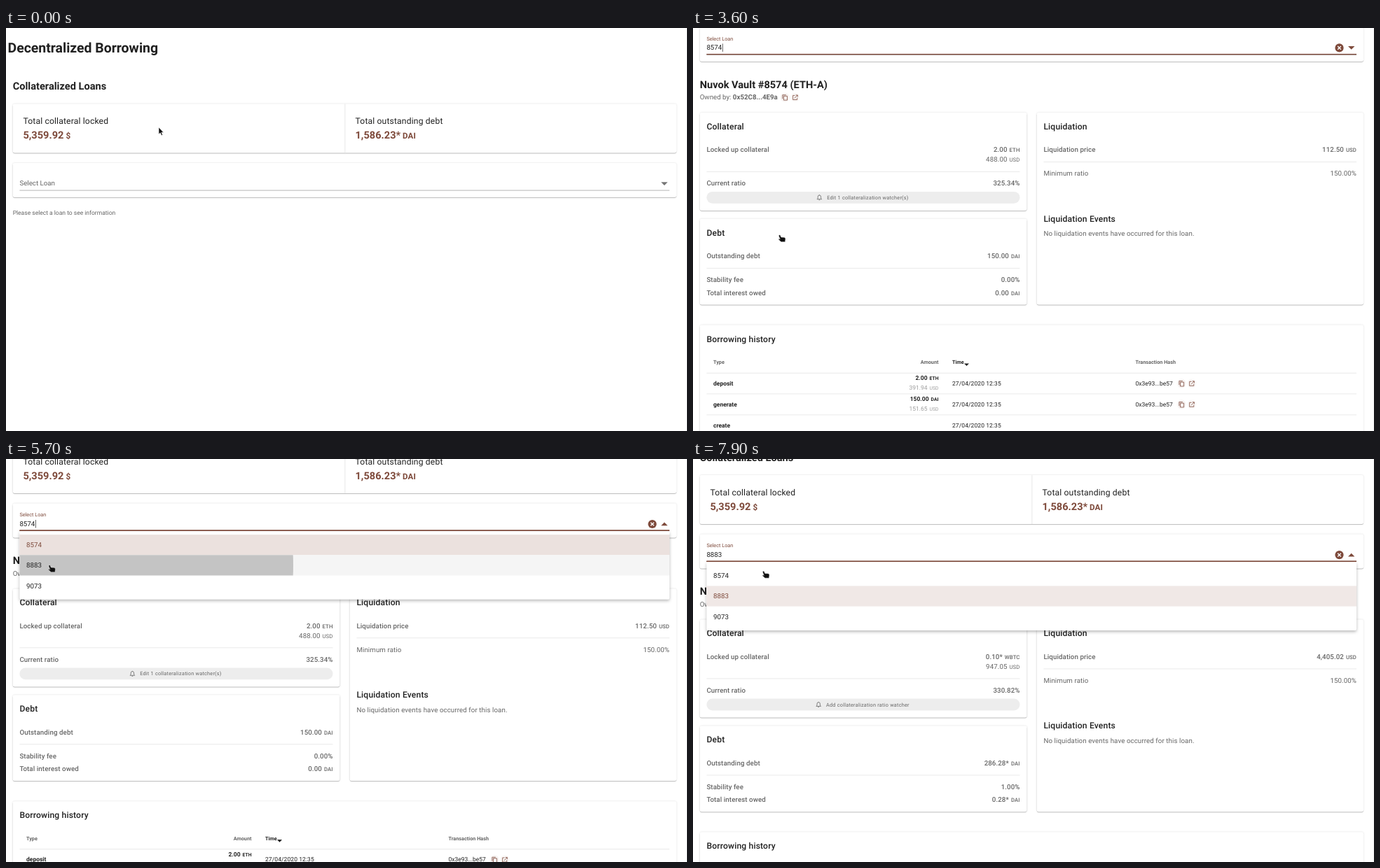
These frames come from a looping animation (972x576 px, 8 s). An HTML page:

```html
<!DOCTYPE html>
<html lang="en">
<head>
<meta charset="utf-8">
<title>Decentralized Borrowing</title>
<style>
html, body { margin: 0; width: 100%; height: 100%; overflow: hidden; background: #fff; }
svg { display: block; width: 972px; height: 576px; font-family: Roboto, sans-serif; }
text { fill: #212121; text-rendering: geometricPrecision; white-space: pre; }
.m { font-weight: 500; }
.b { font-weight: 700; }
.e { text-anchor: end; }
.g { fill: #666; }
.l { fill: #9e9e9e; }
.p { fill: #7e4a3b; }
.card { fill: #fff; filter: drop-shadow(0 1px .5px rgba(0,0,0,.2)) drop-shadow(0 .3px 1px rgba(0,0,0,.14)); }
.menu { fill: #fff; filter: drop-shadow(0 2px 2px rgba(0,0,0,.28)); }
.line { fill: #e0e0e0; }
.icon { fill: none; stroke: #7e4a3b; stroke-width: .8; }
</style>
</head>
<body>
<svg viewBox="0 0 972 576">
  <defs>
    <g id="copy">
      <circle r="6.5" fill="#7e4a3b" opacity=".06"/>
      <path class="icon" d="M-3.4 2V-3.5H1.6M-1.8 -1.9H3.3V3.9H-1.8Z"/>
    </g>
    <g id="open">
      <circle r="6.5" fill="#7e4a3b" opacity=".04"/>
      <path class="icon" d="M-.4 -2.8H-3.2V3.3H2.9V.6M.8 -3.3H3.5V-.6M3.4 -3.2L-1 1.2"/>
    </g>
    <path id="bell" d="M-3.3 2.4H3.3L2.2 1.1V-1A2.2 2.3 0 0 0 -2.2 -1V1.1ZM-.8 3.5H.8M0 -3.2V-4" fill="none" stroke="#666" stroke-width=".8"/>
    <clipPath id="rowClip"><rect id="clipRect" x="19.4" width="927.6" height="29.2"/></clipPath>
  </defs>
  <rect x="971" width="1" height="576" fill="#f0f0f0"/>
  <g id="page">
    <g id="top"></g>
    <g id="vaultA"></g>
    <g id="vaultB"></g>
    <g id="field"></g>
    <g id="menu"></g>
  </g>
  <path id="arrow" d="M0 0V9.8L2.2 7.8L3.9 11.5L5.5 10.8L3.9 7.2H6.8Z" fill="#111" stroke="#fff" stroke-width=".5"/>
  <path id="hand" d="M1.3 .4Q2.6 -.3 3.2 1L4.2 3.5L8.8 3.8Q10.5 4.1 10.5 5.8L10 10.2H4.3L.6 6.8Q.2 5.7 1.6 5.7L2.8 6.4L1 1.7Q.8 .8 1.3 .4Z" fill="#111" stroke="#fff" stroke-width=".4"/>
</svg>
<script>
const $ = id => document.getElementById(id);
const S = 0.6075;                       // page zoom
const px = n => +(n * S).toFixed(3);
const BODY = 0.009, TITLE = 0.0125;     // letter spacing in em

// y is the middle of the capitals; size is in unzoomed pixels
const text = (x, y, str, size, cls = '', track = 0) =>
  `<text x="${x}" y="${y + px(size) * 0.355}" font-size="${px(size)}" class="${cls}" letter-spacing="${px(size) * track}">${str}</text>`;
const unit = (num, name, size) => `${num}<tspan dx="3" font-size="${px(size) * 0.8}">${name}</tspan>`;
const rect = (x, y, w, h, cls, more = '') => `<rect x="${x}" y="${y}" width="${w}" height="${h}" class="${cls}" ${more}/>`;
const card = (x, y, right, bottom) => rect(x, y, right - x, bottom - y, 'card', 'rx="2.4"');
const rule = (x, y, right) => rect(x, y, right - x, 0.7, 'line');
const icons = (x, y) => `<use href="#copy" x="${x}" y="${y}"/><use href="#open" x="${x + 14.6}" y="${y}"/>`;
const label = (x, y, str, cls = 'm g') => text(x, y, str, 16, cls, BODY);
const title = (x, y, str) => text(x, y, str, 20, 'm', TITLE);

$('top').innerHTML =
  text(2.5, 28.5, 'Decentralized Borrowing', 32, 'b') +
  text(9.7, 83, 'Collateralized Loans', 24, 'b') +
  card(9.7, 108.5, 957, 178.5) + rect(483.5, 108.5, 0.8, 70, 'line') +
  text(24.4, 133, 'Total collateral locked', 20, '', TITLE) +
  text(24.4, 153, unit('5,359.92', '$', 24), 24, 'b p') +
  text(498.5, 133, 'Total outstanding debt', 20, '', TITLE) +
  text(498.5, 153, unit('1,586.23*', 'DAI', 24), 24, 'b p') +
  card(9.7, 193, 957, 242) +
  `<g id="hint">${text(9.7, 264, 'Please select a loan to see information', 14, 'g')}</g>`;

function vault(v) {
  const d = v.shift, amount = 350.5 + d, time = 370 + d * 0.9, hash = 631.5 + d * 1.3;
  const rows = ['deposit', 'generate', 'create'].map((type, i) => {
    const y = 701.7 + i * 30, a = v.history[i];
    return text(29, y, type, 14, 'b') + text(time, y, v.time, 14, '', BODY) + rule(19.4, y + 15, 947) +
      (a ? text(amount, y - 7.7, unit(a[0], a[1], 14), 14, 'b e') +
        text(amount, y + 6.8, unit(a[2], 'USD', 14), 14, 'l e') +
        text(hash, y, v.hash, 14) + icons(hash + 65.8, y + 0.5) : '');
  }).join('');
  return text(9.7, 274.5, `Nuvok Vault #${v.id} (${v.kind})`, 24, 'b') +
    text(9.7, 293, `Owned by: <tspan class="b">${v.owner}</tspan>`, 16, 'g') + icons(v.iconX, 293.3) +

    card(9.7, 315, 476.5, 455) + title(19.4, 334.5, 'Collateral') +
    label(19.4, 367.7, 'Locked up collateral') +
    label(466.5, 367.7, unit(v.locked, v.coin, 16), 'm g e') +
    label(466.5, 382, unit(v.worth, 'USD', 16), 'g e') +
    rule(19.4, 399, 466.5) +
    label(19.4, 416, 'Current ratio') + label(466.5, 416, v.ratio, 'm g e') +
    rect(19.4, 428, 447.1, 16.8, '', 'rx="8.4" fill="#ededed"') +
    `<use href="#bell" x="${v.bellX}" y="436.4"/>` +
    text(v.bellX + 10.8, 436.4, v.watch, 12, 'g', 0.033) +

    card(9.7, 466.8, 476.5, 589.6) + title(19.4, 486.5, 'Debt') +
    label(19.4, 519.8, 'Outstanding debt') + label(466.5, 519.8, unit(v.debt, 'DAI', 16), 'm g e') +
    rule(19.4, 537, 466.5) +
    label(19.4, 553.8, 'Stability fee') + label(466.5, 553.8, v.fee, 'm g e') +
    label(19.4, 572.2, 'Total interest owed') + label(466.5, 572.2, unit(v.interest, 'DAI', 16), 'm g e') +

    card(490.7, 315, 957, 589.6) + title(500.4, 334.5, 'Liquidation') +
    label(500.4, 367.7, 'Liquidation price') + label(947, 367.7, unit(v.price, 'USD', 16), 'm g e') +
    rule(500.4, 385, 947) +
    label(500.4, 402, 'Minimum ratio', 'g') + label(947, 402, '150.00%', 'g e') +
    title(500.4, 466.5, 'Liquidation Events') +
    label(500.4, 488, 'No liquidation events have occurred for this loan.', 'g') +

    card(9.7, 618.7, 957, 822.2) + title(19.4, 638.5, 'Borrowing history') +
    text(29, 671.8, 'Type', 12, 'b g') + text(amount, 671.8, 'Amount', 12, 'b g e') +
    text(time, 671.8, 'Time', 12, 'b') + text(hash, 671.8, 'Transaction Hash', 12, 'b g') +
    `<path d="M${time + 17} 673.6h7l-3.5 3.6z" fill="#212121"/>` +
    rule(19.4, 686.9, 947) + rows +
    (v.star ? text(amount + 0.4, 694, '*', 14, 'b') : '') +
    text(722.5, 794.6, 'Rows per page:', 12, '', BODY) + text(794, 794.6, '10', 12) +
    `<path d="M810 792.6h8.6l-4.3 4.3z" fill="#757575"/>` + rect(794, 803.7, 27.5, 0.7, '', 'fill="#949494"') +
    text(845, 794.6, '1-3 of 3', 12) +
    `<path d="M904 789l-5.6 5.6l5.6 5.6M928 789l5.6 5.6l-5.6 5.6" fill="none" stroke="#b0b0b0" stroke-width="1.9"/>`;
}

$('vaultA').innerHTML = vault({
  id: 8574, kind: 'ETH-A', owner: '0x52C8...4E9a', iconX: 131.2, coin: 'ETH', locked: '2.00', worth: '488.00',
  ratio: '325.34%', bellX: 180.4, watch: 'Edit 1 collateralization watcher(s)', debt: '150.00', fee: '0.00%',
  interest: '0.00', price: '112.50', shift: 0, time: '27/04/2020 12:35', hash: '0x3e93...be57',
  history: [['2.00', 'ETH', '391.94'], ['150.00', 'DAI', '151.65']]
});
$('vaultB').innerHTML = vault({
  id: 8883, kind: 'WBTC-A', owner: '0xeBD5...dBBc', iconX: 132, coin: 'WBTC', locked: '0.10*', worth: '947.05',
  ratio: '330.82%', bellX: 179.2, watch: 'Add collateralization ratio watcher', debt: '286.28*', fee: '1.00%',
  interest: '0.28*', price: '4,405.02', shift: 2.8, time: '04/05/2020 18:03', hash: '0xd4eb...872f', star: true,
  history: [['0.10', 'WBTC', '857.86'], ['286.00', 'DAI', '288.14']]
});

const clamp = v => Math.max(0, Math.min(1, v));
const mix = (a, b, k) => a + (b - a) * k;
const out = k => 1 - (1 - k) ** 2;

// start, end, from, to
const scrolls = [[3200, 4000, 0, 258.8], [4100, 4800, 258.8, 129.5], [5800, 6200, 129.5, 279.5], [6600, 7250, 279.5, 85.4]];
// time, x, y, hand
const moves = [
  [300, 218, 142, 0], [600, 200, 100, 0], [900, 160, 165, 0], [1200, 120, 214, 1], [1400, 120, 214, 1],
  [2100, 114, 255, 1], [2400, 120, 268, 1], [2700, 120, 268, 1], [3100, 121.5, 295.5, 1], [4300, 121.5, 295.5, 1],
  [5000, 70, 88, 1], [5200, 70, 88, 1], [5500, 60, 151.5, 1], [5700, 60, 151.5, 1], [6200, 201, 293.5, 0],
  [6700, 201, 293.5, 0], [7200, 138, 189, 1], [7500, 103, 134, 1], [7600, 103, 134, 1], [7900, 98.5, 160, 1]
];
// opened, clicked, selected row, clicked row, colour of the selected row
const menus = [[1300, 2700, -1, 0, ''], [5200, 5700, 0, 1, '#ebe1de'], [7600, 9e9, 1, -1, '#f0e8e6']];

function pointer(t) {
  let i = moves.findIndex(m => m[0] > t);
  if (i === 0) return moves[0];
  if (i < 0) return moves[moves.length - 1];
  const a = moves[i - 1], b = moves[i], k = (t - a[0]) / (b[0] - a[0]);
  return [t, mix(a[1], b[1], k), mix(a[2], b[2], k), a[3]];
}

function field(t, open) {
  const focus = clamp((t - 1200) / 300), k = out(focus), value = t < 2800 ? '' : t < 5800 ? '8574' : '8883';
  const main = focus ? '#7e4a3b' : '#757575', w = 927.6 * k;
  return text(19.4, mix(222, 209.2, k), 'Select Loan', mix(16, 12, k), focus ? 'p' : 'g') +
    rect(19.4, 231.7, 927.6, 0.7, '', `fill="${t < 1000 ? '#949494' : '#212121'}"`) +
    rect(483.2 - w / 2, 231, w, 1.4, 'p') +
    `<path d="${open ? 'M935 224.8h9.4l-4.7 -4.7z' : 'M935 220.2h9.4l-4.7 4.7z'}" fill="${main}"/>` +
    (value && text(19.4, 222, value, 16) +
      `<circle cx="922.5" cy="222.5" r="6.1" class="p"/><path d="M920.2 220.2l4.6 4.6m0 -4.6l-4.6 4.6" stroke="#fff" stroke-width="1.4"/>`) +
    (value && t < 7600 ? rect(41.9, 216.5, 0.7, 11.5, '', 'fill="#212121"') : '');
}

function list(t, m, x, y) {
  const [, click, selected, target, tint] = m;
  let s = rect(19.4, 232.7, 927.6, 97.6, 'menu', 'rx="2"');
  ['8574', '8883', '9073'].forEach((id, i) => {
    const top = 237.6 + i * 29.2;
    const hover = i === target && (t >= click || y >= top && y < top + 29.2);
    if (i === selected || hover) s += rect(19.4, top, 927.6, 29.2, '', `fill="${i === selected ? tint : '#f5f5f5'}"`);
    if (hover && t >= click) {
      $('clipRect').setAttribute('y', top);
      s += `<circle cx="${t > click ? 120 : x + 4}" cy="${top + 14.6}" r="${t > click ? 1000 : 346}" opacity=".2" clip-path="url(#rowClip)"/>`;
    }
    s += text(29, top + 14.6, id, 16, i === selected ? 'p' : '');
  });
  return s + rect(19.4, 231, 927.6, 1.4, 'p');
}

function draw(t) {
  let scroll = 0;
  for (const [a, b, from, to] of scrolls) if (t > a) scroll = mix(from, to, out(clamp((t - a) / (b - a))));
  const [, x, y, hand] = pointer(t);
  const m = menus.find(m => t >= m[0] && t < m[1] + 300);
  $('page').setAttribute('transform', `translate(0 ${-scroll})`);
  const show = (id, on) => $(id).style.display = on ? '' : 'none';
  show('hint', t < 2800);
  show('vaultA', t >= 2800 && t < 5800);
  show('vaultB', t >= 5800);
  $('field').innerHTML = field(t, m && t <= m[1]);
  $('menu').innerHTML = m ? list(t, m, x, y + scroll) : '';
  $('menu').setAttribute('opacity', m ? Math.min(clamp((t - m[0] + 100) / 300), clamp(1 - (t - m[1]) / 300)) : 0);
  for (const id of ['arrow', 'hand']) {
    show(id, (id === 'hand') === !!hand);
    $(id).setAttribute('transform', `translate(${x} ${y})`);
  }
}

let last = -1;
function tick() {
  const t = Math.floor(performance.now() % 8000 / 100) * 100;   // the screen refreshes ten times a second
  if (t !== last) draw(last = t);
  requestAnimationFrame(tick);
}
tick();
</script>
</body>
</html>
```
